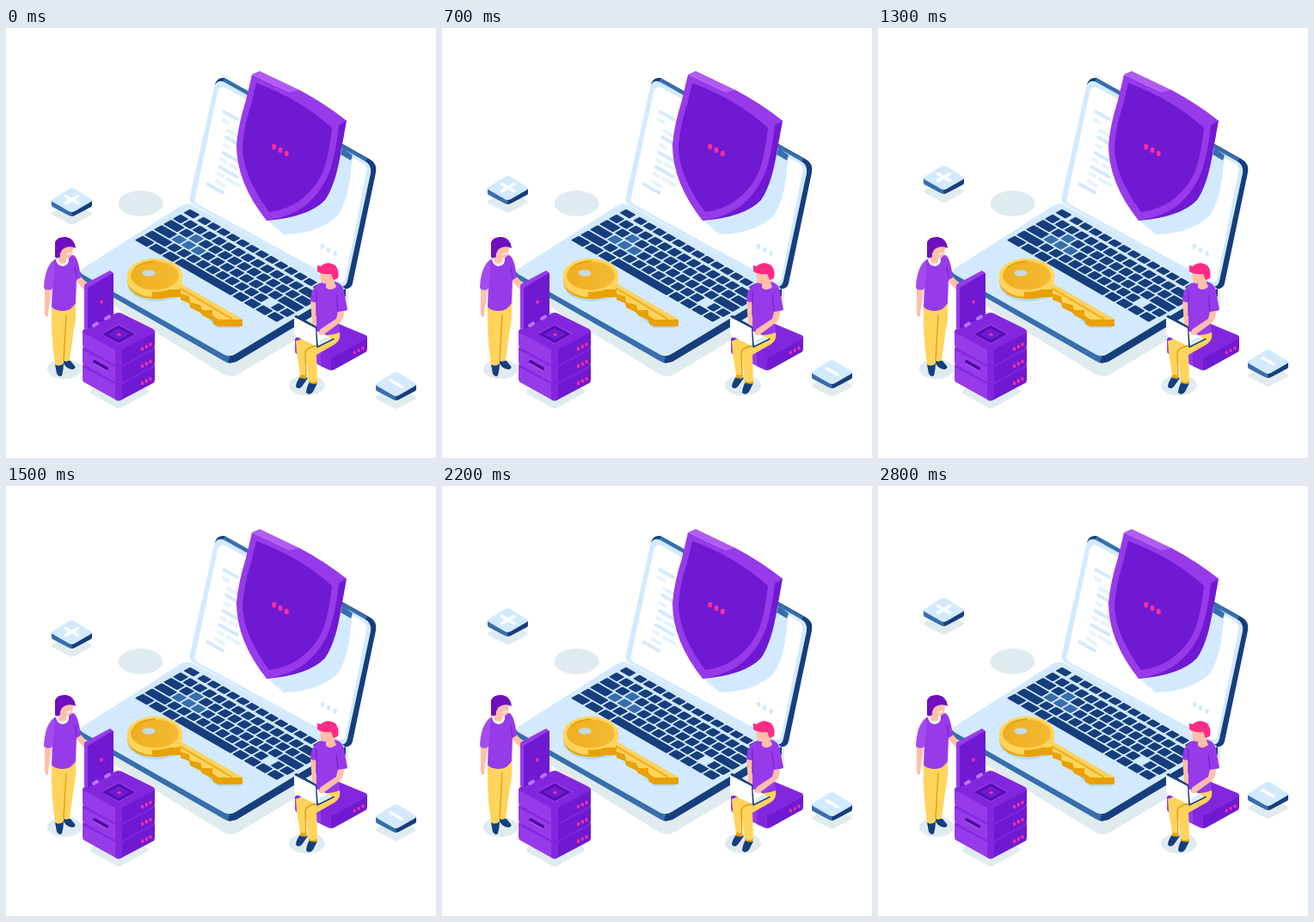
An HTML page that plays this animation: 500x500 px, repeating every 2900 ms.

```html
<!DOCTYPE html>
<html lang="en">
<head>
<meta charset="utf-8">
<title>Isometric security scene</title>
<style>
  html, body { margin: 0; width: 100%; height: 100%; overflow: hidden; background: #fff; }
  svg { display: block; width: 100vw; height: 100vh; }
  .pale { fill: #d3eafe; } .blue { fill: #376eac; } .navy { fill: #163e7c; }
  .shade { fill: #e0ebf0; } .white { fill: #fff; }
  .deep { fill: #6f1ad2; } .mid { fill: #8327df; } .lit { fill: #973aea; } .glow { fill: #b05cf0; }
  .pink { fill: #fd2e9b; } .skin { fill: #ffbfa9; } .gold { fill: #ffd45c; }
  .amber { fill: #e8a106; }
  .line { fill: none; stroke-linecap: round; }
  .float { animation: rise 2.9s steps(29) infinite; }
  @keyframes rise { to { transform: translateY(-58px); } }
</style>
</head>
<body>
<svg viewBox="0 0 500 500">
  <defs>
    <linearGradient id="bow" x1="0" x2="1">
      <stop offset="0" stop-color="#eeae22"/><stop offset="1" stop-color="#f5ba31"/>
    </linearGradient>
    <g id="tile">
      <path class="shade" d="M1 28.500L21 18Q23.500 17 26 18L46 28.500Q48 30 46 31.500L26 42Q23.500 43.500 21 42L1 31.500Q-1 30 1 28.500Z"/>
      <path class="blue" d="M0 14L24 23V33Q22 33 20 32L1 22Q0 21 0 20Z"/>
      <path class="navy" d="M47 14L23.500 23V33Q25 33 27 32L46 22Q47 21 47 20Z"/>
      <path class="pale" d="M1 13L20 1.300Q23.500-.7 27 1.300L46 13Q48 14.500 46 16L27 27Q23.500 29 20 27L1 16Q-1 14.500 1 13Z"/>
    </g>
    <g id="box">
      <path class="lit" d="M89 352L131 372V393Q129 393 127 392L91 372Q89 371 89 368Z"/>
      <path class="deep" d="M173 352L131 372V393Q133 393 135 392L171 373Q173 372 173 369Z"/>
      <path class="mid" d="M127 374H135V392Q131 395 127 392Z"/>
      <path class="mid" d="M91 350L127 332Q131 330 135 332L171 350Q175 353 171 355L135 374Q131 376 127 374L91 355Q87 353 91 350Z"/>
      <g class="pink"><ellipse cx="158.500" cy="373" rx="1.700" ry="2.200"/><ellipse cx="163.300" cy="370.500" rx="1.700" ry="2.200"/><ellipse cx="168" cy="368" rx="1.700" ry="2.200"/></g>
    </g>
    <path id="seam" fill="#5a12b4" d="M93 360V373L131 394L169 373V360Z"/>
  </defs>
  <rect width="500" height="500" fill="#fff"/>

  <!-- ground shadows -->
  <g class="shade">
    <ellipse cx="156.500" cy="204" rx="26" ry="15"/>
    <ellipse cx="68" cy="396.500" rx="20" ry="11.500"/>
    <ellipse cx="350" cy="415.500" rx="21" ry="12"/>
    <path d="M100 420L131 404L164 420Q168 423 164 425L135 441Q131 444 127 441L100 426Q96 423 100 420Z"/>
    <path d="M90 302L252 402Q261 408 271 402L398 326V300Z"/>
  </g>

  <!-- laptop base -->
  <path class="blue" d="M85 283L254 376L262 380V390Q257 390 253 387L86 291Z"/>
  <path class="navy" d="M261 379L395 303V312L268 388Q262 390 258 389Z"/>
  <path class="pale" d="M90 279L203 207Q211 202 219 207L394 302L267 379Q261 383 254 380L90 287Q83 283 90 279Z"/>

  <!-- laptop lid -->
  <path class="navy" d="M243 66Q245 57 254 58L422 152Q432 157 430 168L403 297Q401 304 394 303L380 290Z"/>
  <path class="line" d="M253 60.500L419 154" stroke="#376eac" stroke-width="5" style="stroke-linecap:butt"/>
  <path class="pale" d="M242 69Q245 59 254 63L416 154Q426 159 424 169L397 294Q395 302 389 300L219 206Q212 203 214 195Z"/>
  <path class="white" d="M246 75Q248 66 256 70L413 156Q421 161 419 168L395 289Q393 298 386 294L225 206Q218 203 220 197Z"/>
  <g class="line" stroke="#d3eafe" stroke-width="4">
    <path d="M253.500 97.500L269 106M256 127L270 135M252.500 145L270 155M248.500 161.500L269 173M234.500 181.500L252 191.500"/>
    <path stroke="#e5f3ff" d="M252 106.500L258 110M258 119.500L269 125.500M254 136L260 139.500M250.500 153L255 156M260 158.500L269 163.500M246.500 169.500L252 172.500M257.500 175.500L271 183.500M244.500 178L254 184"/>
  </g>
  <g class="pale">
    <ellipse cx="368" cy="254" rx="2.300" ry="3"/><ellipse cx="375" cy="258" rx="2.300" ry="3"/><ellipse cx="382.500" cy="262" rx="2.300" ry="3"/>
    <path d="M386 144L403 149L400 174Q396 205 384 220Q362 239 323 240Q312 232 303 222Z"/>
  </g>
  <path class="blue" d="M391 139L403 148L401 154L389 147Z"/>

  <!-- shield -->
  <path class="deep" d="M340 72Q369 87 396 108L388 152Q382 184 371 200Q352 220 303 224L330 74Z"/>
  <path class="lit" d="M286 54L331 75L341 72Q371 88 396 108L387 113Q384 142 377 165Q369 187 353 202Q335 219 303 224Q268 180 268 136Q270 112 279 84Z"/>
  <path class="glow" d="M286 54L295 50L341 72L331 75Z"/>
  <path class="deep" d="M291 64Q341 82 379 116Q376 146 369 166Q361 185 346 197Q330 211 306 214Q275 172 275 137Q277 113 285 89Z"/>
  <g class="pink"><ellipse cx="311.700" cy="138" rx="2.500" ry="3.200"/><ellipse cx="319" cy="142" rx="2.500" ry="3.200"/><ellipse cx="326.200" cy="146" rx="2.500" ry="3.200"/></g>

  <g id="keys" transform="matrix(11.200 6.450 -11 6.200 214 209.500)"></g>

  <!-- golden key -->
  <path fill="#b9d8ee" d="M141 300Q148 318 178 318L206 312L246 349H273L200 300Z"/>
  <path class="amber" d="M141 287V296Q145 314 173 315Q183 315 190 313H203V316L213 320L214 325L226 331L228 334L240 340L241 344L247 347H275V339L204 298Z"/>
  <path class="gold" d="M204 298L275 339H247L240 334V328L228 328L226 322L214 319L213 312L203 309L203 304H188Z"/>
  <path class="gold" d="M141 287H205V295Q202 305 189 304Q180 315 163 312Q142 306 141 294Z"/>
  <path class="amber" d="M188 304H170V314Q183 315 190 312Z"/>
  <ellipse class="gold" cx="173" cy="287.500" rx="32" ry="19.500"/>
  <ellipse cx="173" cy="288" rx="28" ry="16.500" fill="url(#bow)"/>
  <path class="line" d="M150 279Q158 272 173 271" stroke="#e29b06" stroke-width="1.500"/>
  <ellipse cx="166" cy="285" rx="7.500" ry="3.800" fill="#c4dbe5"/>
  <path class="line" d="M203 303L262 338" stroke="#eeb02a" stroke-width="2.500"/>

  <!-- woman -->
  <path class="navy" d="M57 391L67 390Q67 397 65 404Q62 407 59 402ZM67 386L75 387L80 393Q82 396 77 397Q70 396 67 390Z"/>
  <path class="gold" d="M53 324L81 320Q82 338 79 350L74 386Q71 389 67 387L66 391Q61 394 57 391Q52 358 53 324Z"/>
  <path class="line" d="M70 334L67 386" stroke="#dc9b16" stroke-width="1.300"/>
  <path class="skin" d="M45 301H53Q52 318 50 324L49 335Q46 338 45 331ZM79 291L86 288L95 298Q97 305 92 306Z"/>
  <path class="lit" d="M57 269L78 264Q84 266 87 290L82 293L81 320Q75 330 64 329Q55 328 53 324L55 271Z"/>
  <path fill="#a34bee" d="M57 269L55 299L53 304Q46 306 44 302Q45 280 54 271Z"/>
  <path class="line" d="M80 278L82 291" stroke="#7620d4" stroke-width="1"/>
  <path class="white" d="M58 269Q65 263 73 267Q74 276 66 277Q59 276 58 269Z"/>
  <path class="skin" d="M61 267L64 256Q70 248 78 255L77 263Q75 268 70 267V272Q66 276 61 272Z"/>
  <path fill="#6f0fc0" d="M57 249Q60 242 70 243Q80 245 81 256Q73 252 66 257Q62 262 63 266Q58 269 57 266Z"/>
  <path class="line" d="M71 263L75 262" stroke="#fff" stroke-width="1.500"/>

  <!-- server stack -->
  <use href="#box" y="40"/>
  <use href="#seam" y="20"/>
  <use href="#box" y="20"/>
  <path class="line" d="M103 388L117 396" stroke="#4e0da0" stroke-width="4"/>
  <path class="line" d="M102 390L117 398.500" stroke="#b76bf4" stroke-width="1"/>
  <use href="#seam"/>
  <use href="#box"/>
  <path class="lit" d="M111 355.500L131 344L152 355.500L131 368Z"/>
  <path fill="#5610ae" d="M112 356L131 345.500L150 356L131 366.500Z"/>
  <path class="deep" d="M118 356L131 349L144 356L131 363Z"/>
  <ellipse class="pink" cx="131.500" cy="356.500" rx="2.300" ry="1.500"/>
  <path class="lit" d="M91 300Q91 298 93 297L121 282L125 285L124 334L96 351Q91 351 91 348Z"/>
  <path class="deep" d="M95 302L124 285Q125 285 125 287V332Q125 334 123 335L95 351Z"/>
  <path class="line" d="M102 346L106 343.500M116 338L120 335.500" stroke="#b875f2" stroke-width="4"/>
  <ellipse class="pink" cx="111" cy="318.500" rx="1.700" ry="2.200"/>

  <!-- seat -->
  <path class="lit" d="M336 361L378 380V398Q376 398 374 397L338 379Q336 378 336 375Z"/>
  <path class="mid" d="M366 376L378 380V398L366 393Z"/>
  <path class="deep" d="M420 359L378 380V398Q380 398 382 397L418 377Q420 376 420 373Z"/>
  <path class="mid" d="M338 360L374 342Q378 340 382 342L418 357Q422 359 418 362L382 382Q378 384 374 382L338 364Q334 362 338 360Z"/>
  <g class="pink"><ellipse cx="405.300" cy="377.500" rx="1.600" ry="2.100"/><ellipse cx="410.200" cy="375" rx="1.600" ry="2.100"/><ellipse cx="415" cy="372.300" rx="1.600" ry="2.100"/></g>

  <!-- man -->
  <path class="navy" d="M343 404L351 407L344 417Q340 421 337 417Q337 412 343 404ZM353 411L362 413L357 423Q353 428 349 424Q349 419 353 411Z"/>
  <path class="gold" d="M337 364L366 353L388 354Q390 363 382 368L361 380L362 411Q357 416 352 411L349 385L349 405Q346 408 342 404L338 377Z"/>
  <path class="line" d="M349 404L348 377Q350 371 360 370" stroke="#dc9b16" stroke-width="1.300"/>
  <path class="amber" d="M342 403L349 404V408L342 407ZM352 410Q357 414 362 410L361 414L353 413Z"/>
  <path class="skin" d="M354 317H362L361 347L356 344Z"/>
  <path class="lit" d="M361 299Q370 293 383 295Q391 297 393 306L397 328L386 331L388 354Q374 360 361 355L361 319L354 318Q354 305 361 299Z"/>
  <path class="line" d="M361 306V334M384 311L386 329" stroke="#7620d4" stroke-width="1.200"/>
  <path class="skin" d="M365 285Q375 281 383 287L382 296L384 301Q378 307 372 302L372 297Q367 298 366 293Z"/>
  <path fill="#ff2c86" d="M362 276L366 277Q374 270 383 276Q388 282 386 291L381 293L378 286Q368 287 362 283Z"/>
  <path class="white" d="M362 371L380 362L370 356L360 352Z"/>
  <path class="line" d="M362 371L381 361.500" stroke="#163e7c" stroke-width="1.500"/>
  <path class="pale" d="M364 364L373 359L377 361L367 367Z"/>
  <path class="skin" d="M386 330L393 329Q393 338 389 342L370 356Q366 359 363 355L366 350L384 338Z"/>
  <path class="navy" d="M335 335L338 334L361 347L363 371L360 370Z"/>
  <path class="white" d="M335 336L360 349L361 370L338 359Q335 357 335 354Z"/>

  <!-- floating tiles -->
  <g class="float">
    <use href="#tile" x="53" y="186"/>
    <use href="#tile" x="430" y="400"/>
    <path class="line" d="M69.500 195.500L83.500 203.500M69.500 203.500L83.500 195.500M447 409.500L460 417" stroke="#fff" stroke-width="3.500"/>
  </g>
</svg>
<script>
  const keys = document.getElementById("keys");

  // Key widths per row; a negative width leaves a gap.
  const rows = [
    [1.2, -.2, ...Array(13).fill(1), .6],
    [...Array(13).fill(1), 2],
    [1.6, ...Array(12).fill(1), 1.4],
    [1.8, ...Array(11).fill(1), 2.2],
    [2.3, ...Array(10).fill(1), -.8, .9, 1],
    [1.4, 1.4, 1.3, 6, 1.2, 1.2, 1.2, 1.2]
  ];
  const accents = ["2,2", "3,1", "3,2", "3,3"];

  rows.forEach((row, r) => {
    let x = 0;
    row.forEach((w, i) => {
      if (w > 0) {
        const key = document.createElementNS("http://www.w3.org/2000/svg", "rect");
        const box = { x: x + .08, y: r + .08, width: w - .16, height: r ? .84 : .7, rx: .1 };
        for (const name in box) key.setAttribute(name, box[name]);
        key.setAttribute("class", accents.includes(r + "," + i) ? "blue" : "navy");
        keys.append(key);
      }
      x += Math.abs(w);
    });
  });
</script>
</body>
</html>
```
